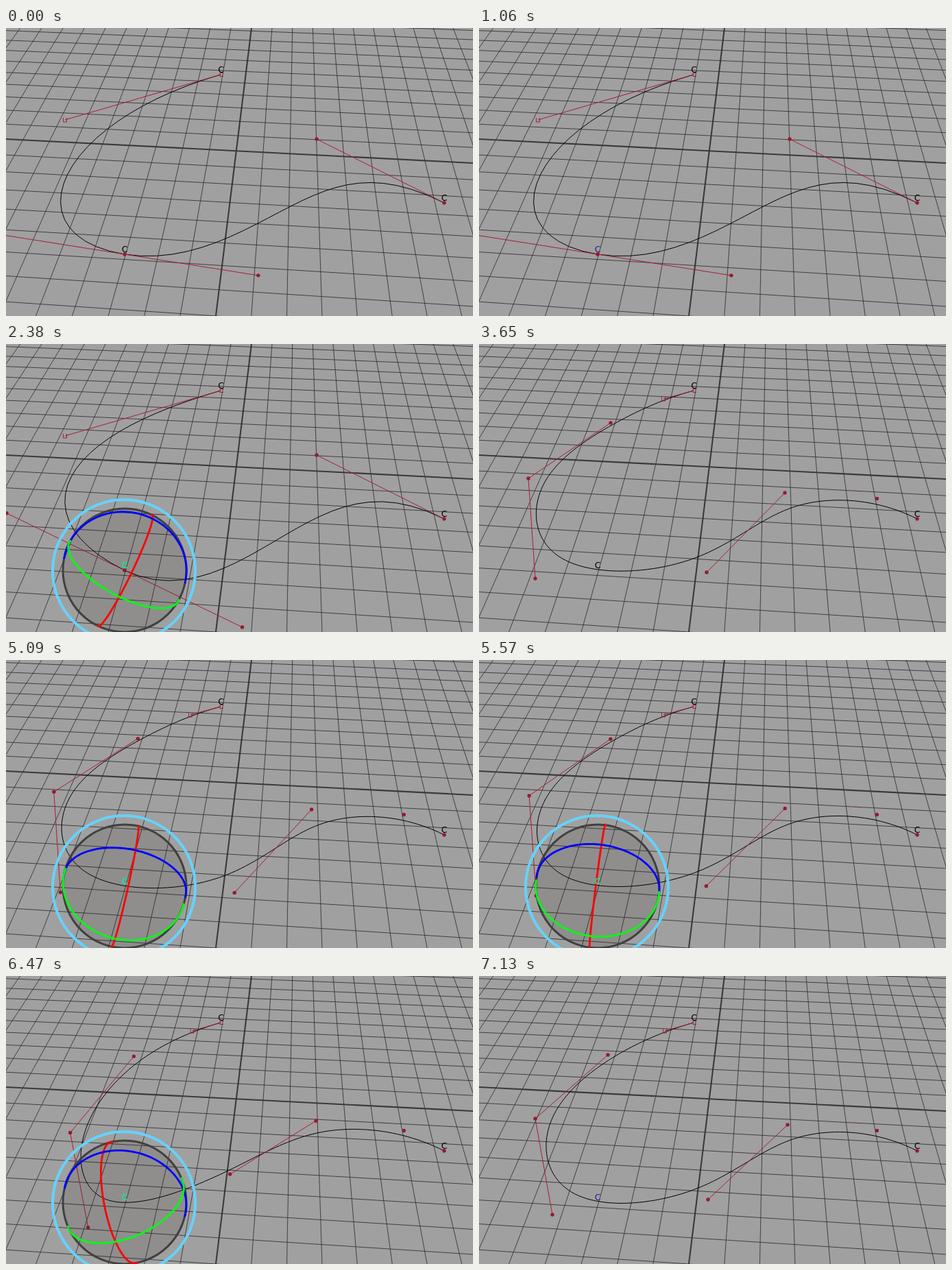
An HTML page that plays this animation: 681 px wide and 420 px high, repeating every 7670 ms.

```html
<!DOCTYPE html>
<html lang="en">
<head>
<meta charset="utf-8">
<title>Curve tangents</title>
<style>
  html, body { margin: 0; width: 100%; height: 100%; overflow: hidden; background: #a0a0a0; }
  svg { display: block; width: 100%; height: 100%; }
  text { font: 12.5px "DejaVu Sans", sans-serif; text-anchor: middle; }
  .grid { stroke: #303030; stroke-width: .85; }
  .axis { stroke: #3a3a3a; stroke-width: 2.1; }
  .curve { fill: none; stroke: #000; stroke-width: 1; }
  .red { fill: none; stroke: #a81c34; stroke-width: 1; }
  .dots { fill: #98192f; }
  .ring { fill: none; stroke-width: 2.8; stroke-linecap: round; }
</style>
</head>
<body>
<svg viewBox="0 0 681 420">
  <rect width="681" height="420" fill="#a0a0a0"/>
  <g id="grid"></g>
  <path id="curve" class="curve"/>
  <path id="handles" class="red"/>
  <path id="faint" class="red" d="M546 214L557 215" opacity=".45"/>
  <g id="dots" class="dots"></g>
  <g id="gizmo">
    <circle cx="173" cy="330" r="90" fill="#221a10" fill-opacity=".13" stroke="#404040" stroke-width="3"/>
    <circle cx="172" cy="331" r="104" fill="none" stroke="#66d2fb" stroke-width="4"/>
    <path class="ring" stroke="#f00"/>
    <path class="ring" stroke="#00f"/>
    <path class="ring" stroke="#0f1"/>
  </g>
  <text x="313.5" y="64.5">C</text>
  <text x="639" y="252">C</text>
  <text id="label" x="173" y="327">C</text>
</svg>
<script>
const LOOP = 7670, STEP = 60, HORIZON = 573, SWITCH = 3650;
const DRAG_A = [1600, 2620], DRAG_B = [5030, 6590];
const $ = id => document.getElementById(id);
const START = [313, 68], MID = [173, 330], END = [639, 255];

// Free control points of the second curve: at rest, fully turned, released.
const REST = [[269, 80], [192, 115], [72, 196], [82, 342], [332, 333], [446, 217]];
const TURNED = [[271, 80], [187, 120], [103, 249], [120, 389], [315, 242], [452, 203]];
const RELEASED = [[271, 80], [188, 115], [82, 208], [107, 348], [334, 326], [450, 217]];

const BEZIER = [0, 0, 0, 0, 1, 1, 1, 2, 2, 2, 2];
const UNIFORM = [0, 0, 0, 0, 1, 2, 3, 4, 5, 6, 6, 6, 6];

const clamp = v => Math.min(1, Math.max(0, v));
const ease = v => v * v * (3 - 2 * v);
const line = pts => "M" + pts.map(p => p.map(v => v.toFixed(2)).join(" ")).join("L");
const weight = y => 1 / (y + HORIZON);

// A drag advances in steps; the result runs from 0 to 1.
const progress = (t, [from, to]) => clamp(Math.floor((t - from) / STEP) * STEP / (to - from));

// Out-and-back motion: a swing plus its first overtone.
const wave = (u, a, b) => a * Math.sin(Math.PI * u) + b * Math.sin(2 * Math.PI * u);
const turnB = t => wave(progress(t, DRAG_B), .59, -.59);

// Axes of the gizmo: x right, y down, z towards the viewer.
function axes(t) {
  const u = progress(t, DRAG_A), s = turnB(t), rad = Math.PI / 180;
  const roll = (9 + wave(u, 39, 9.5) - 49 * s) * rad;
  const yaw = (wave(u, 38, 32) + 43 * s) * rad;
  const pitch = (52.3 + wave(u, 7, 34) - 44 * s) * rad;
  const turn = ([x, y, z]) => {
    const x1 = x * Math.cos(yaw) - z * Math.sin(yaw);
    const z1 = x * Math.sin(yaw) + z * Math.cos(yaw);
    return [x1 * Math.cos(roll) - y * Math.sin(roll), x1 * Math.sin(roll) + y * Math.cos(roll), z1];
  };
  return [
    [1, 0, 0],
    [0, Math.sin(pitch), Math.cos(pitch)],
    [0, -Math.cos(pitch), Math.sin(pitch)]
  ].map(turn);
}

// Near half of the circle spanned by two axes.
function halfRing(u, v) {
  const near = Math.atan2(v[2], u[2]), pts = [];
  for (let i = 0; i <= 40; i++) {
    const a = near + (i / 40 - .5) * Math.PI;
    const [x, y, z] = u.map((c, k) => c * Math.cos(a) + v[k] * Math.sin(a));
    const r = 90 / (1 - .08 * z);
    pts.push([MID[0] + r * x, MID[1] + r * y]);
  }
  return line(pts);
}

// End of a tangent handle, with its perspective weight.
function handle([x, y, z], side) {
  const w = 1 - side * .18 * (z + .17 * x - .12 * y), r = side * 192 / w;
  return [MID[0] + r * x, MID[1] + r * y, w * weight(MID[1])];
}

// Cubic B-spline in perspective; points lie on the ground unless weighted.
function spline(pts, knots) {
  const cv = pts.map(([x, y, w = weight(y)]) => [x * w, y * w, w]);
  const out = [], steps = 24;
  for (let k = 3; k < cv.length; k++) {
    if (knots[k] === knots[k + 1]) continue;
    for (let s = 0; s <= steps; s++) {
      const t = knots[k] + (knots[k + 1] - knots[k]) * s / steps;
      const d = cv.slice(k - 3, k + 1);
      for (let r = 1; r < 4; r++) {
        for (let j = 3; j >= r; j--) {
          const lo = knots[j + k - 3], hi = knots[j + 1 + k - r], f = (t - lo) / (hi - lo);
          d[j] = d[j].map((v, c) => d[j - 1][c] * (1 - f) + v * f);
        }
      }
      out.push([d[3][0] / d[3][2], d[3][1] / d[3][2]]);
    }
  }
  return line(out);
}

function drawGrid() {
  let svg = "";
  const add = (k, x1, y1, x2, y2) => {
    svg += `<line class="${k ? "grid" : "axis"}" x1="${x1}" y1="${y1}" x2="${x2}" y2="${y2}"/>`;
  };
  for (let k = -22; k <= 12; k++) {
    const x = (358 + 30.7 * k) / (1 + .002 * k);
    add(k, x, 0, 429 + (x - 429) * (420 + HORIZON) / HORIZON, 420);
  }
  for (let k = -12; k <= 8; k++) {
    const s = 735 / (1 - .0305 * k);
    add(k, 0, s - HORIZON, 681, s * 1.0476 - HORIZON);
  }
  $("grid").innerHTML = svg;
}

const rings = document.querySelectorAll(".ring");

function drawGizmo(t) {
  const on = (t >= 1360 && t < 2760) || (t >= 4850 && t < 6830);
  const hover = (t >= 1000 && t < 1360) || (t >= 4550 && t < 4850) || t >= 7130;
  const a = axes(t);
  $("gizmo").style.display = on ? "" : "none";
  rings.forEach((ring, i) => ring.setAttribute("d", halfRing(a[(i + 1) % 3], a[(i + 2) % 3])));
  const ink = on ? "#10e890" : hover ? "#20209c" : "#000";
  $("label").setAttribute("fill", ink);
  $("label").setAttribute("stroke", on ? ink : "none");
  $("label").setAttribute("stroke-width", .5);
}

// Bezier curve whose middle tangent follows the gizmo's red axis.
function tangentCurve(t) {
  const [red] = axes(t), a = handle(red, -1), b = handle(red, 1);
  const first = [86, 134], far = [453, 162];
  return {
    pts: [START, first, a, MID, b, far, END], knots: BEZIER,
    strokes: [[START, first], [a, MID, b], [far, END]],
    dots: [a, MID, b, far, END]
  };
}

function pointCurve(t) {
  const s = turnB(t), e = ease(clamp((t - 6050) / (DRAG_B[1] - 6050)));
  const p = REST.map((pt, i) => pt.map((v, c) => v + s * (TURNED[i][c] - v) + e * (RELEASED[i][c] - v)));
  const far = [580.3, 225.5];
  return {
    pts: [START, ...p, far, END], knots: UNIFORM,
    strokes: [[START, p[0]], p.slice(1, 4), p.slice(4)],
    dots: [...p.slice(1), far, END]
  };
}

function drawCurve(t) {
  const tangents = t < SWITCH;
  const { pts, knots, strokes, dots } = tangents ? tangentCurve(t) : pointCurve(t);
  const [ux, uy] = pts[1];
  const marks = `M${ux - 2.5} ${uy - 3}v6h5v-6M317 65.5h-5v5h5`;
  $("curve").setAttribute("d", spline(pts, knots));
  $("handles").setAttribute("d", strokes.map(s => line(s.map(p => p.slice(0, 2)))).join("") + marks);
  $("faint").style.display = tangents ? "none" : "";
  $("dots").innerHTML = dots.map(([x, y]) => `<circle cx="${x}" cy="${y}" r="2.7"/>`).join("");
}

function draw(t) {
  drawCurve(t);
  drawGizmo(t);
}

drawGrid();
draw(0);
const began = performance.now();
(function frame() {
  draw((performance.now() - began) % LOOP);
  requestAnimationFrame(frame);
})();
</script>
</body>
</html>
```
